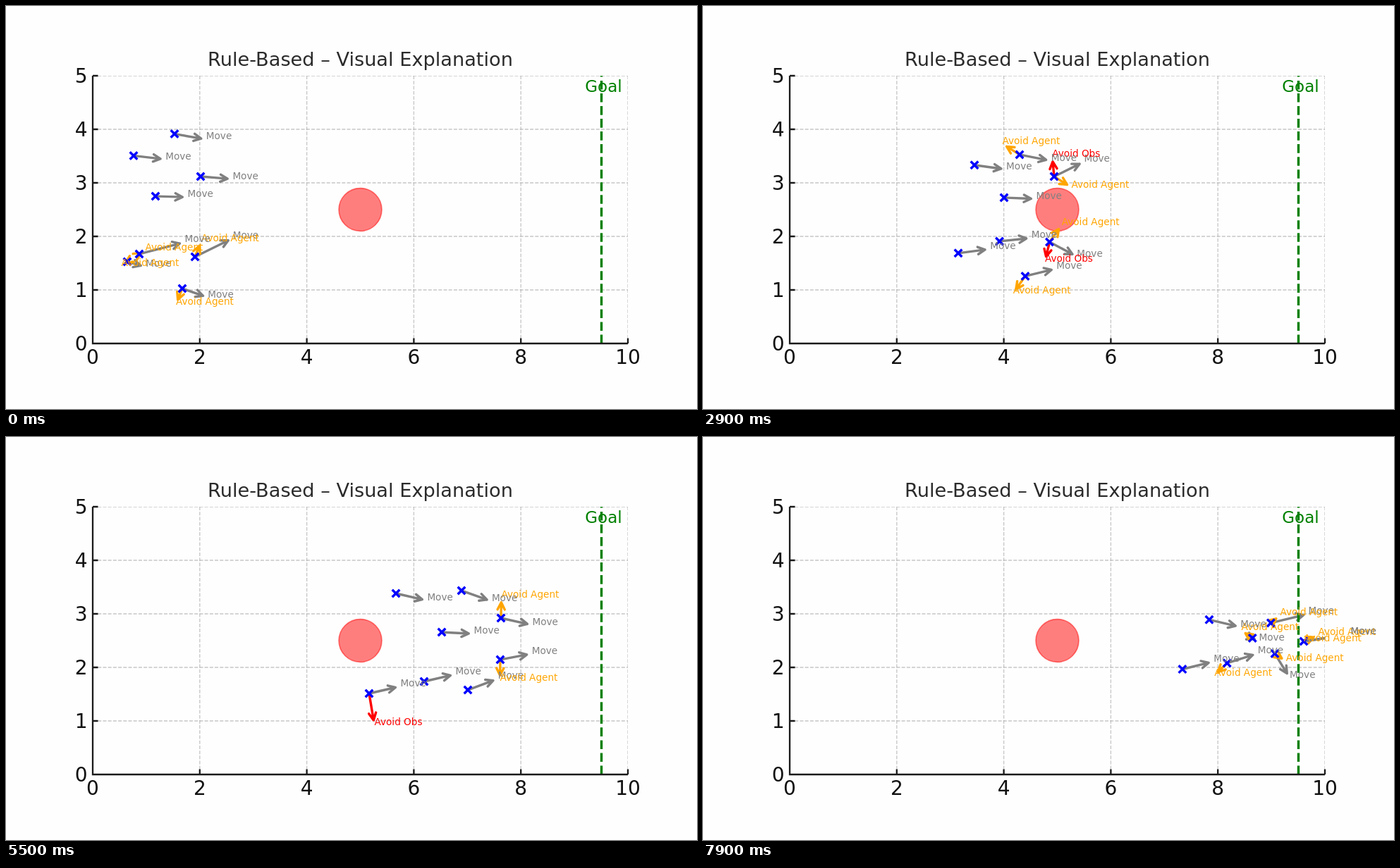
An HTML page for the animation above (8 s loop, 980x572 px).

```html
<!DOCTYPE html>
<html lang="en">
<head>
<meta charset="utf-8">
<title>Rule-Based – Visual Explanation</title>
<style>
  html, body { margin: 0; width: 100%; height: 100%; overflow: hidden; background: #fefefe; }
  svg { display: block; font-family: "DejaVu Sans", sans-serif; }
</style>
</head>
<body>
<svg width="980" height="572" viewBox="0 0 980 572">
  <defs><clipPath id="plot"><rect x="123" y="99" width="759" height="380"/></clipPath></defs>
  <g id="grid" clip-path="url(#plot)" stroke="#b0b0b0" stroke-opacity=".7" stroke-width="1.36" stroke-dasharray="5.03 2.18"></g>
  <circle cx="502.5" cy="289" r="30.4" fill="#f00" stroke="#f00" stroke-width="1.7" fill-opacity=".5" stroke-opacity=".5"/>
  <g id="arrows" clip-path="url(#plot)" fill="none" stroke-width="3.4" stroke-linecap="round" stroke-linejoin="round"></g>
  <path d="M844.5 479V99" stroke="#008000" stroke-width="3.4" stroke-dasharray="12.58 5.44"/>
  <path id="marks" fill="none" stroke="#00f" stroke-width="3.4"/>
  <path id="axes" fill="none" stroke="#1a1a1a" stroke-width="2.3"/>
  <g id="ticks" font-size="28" fill="#111"></g>
  <text x="502.5" y="85" font-size="27.2" fill="#2b2b2b" text-anchor="middle">Rule-Based – Visual Explanation</text>
  <text x="821.3" y="121.8" font-size="23" fill="#008000">Goal</text>
  <g id="labels" font-size="13.6"></g>
</svg>
<script>
const LOOP = 8000, STEP = 100;
const UNIT = 75.9;
const OBSTACLE = [502.5, 289], GOAL = [844.5, 289], FINISH = [852, 290];
const AGENT_RANGE = 60.6, CROWD_RANGE = 50, OBSTACLE_RANGE = 76.3, PUSH_RANGE = 74.2;
const FINAL_SPEED = .0615; // px per ms
const GRAY = '#808080', ORANGE = '#ffa500', RED = '#ff0000';

// Way points of each agent; after the last one it heads for the finish.
const times = [0, 2300, 3500, 5500, 7000];
const paths = [
  [[212, 270], [392, 274], [462, 270], [618, 277], [724, 282]],
  [[276, 242], [449, 254], [547, 230], [702, 257], [811, 261]],
  [[250, 401], [417, 383], [497, 384], [655, 359], [760, 329]],
  [[239, 181.5], [409, 210], [489, 212], [646, 218], [757, 237]],
  [[268, 356], [444, 328], [539, 342], [701, 316], [818, 313]],
  [[189, 352], [383, 332], [458, 336], [593, 347], [690, 336]],
  [[172, 363], [322, 355], [402, 346.5], [515, 364], [626, 342]],
  [[181, 212.5], [347, 224], [423, 227.5], [553, 222], [664, 247]]
];

const $ = id => document.getElementById(id);
const add = (a, b, k = 1) => [a[0] + b[0] * k, a[1] + b[1] * k];
const sub = (a, b) => add(a, b, -1);
const scale = (v, k) => [v[0] * k, v[1] * k];
const len = v => Math.hypot(v[0], v[1]);
const unit = v => scale(v, 1 / (len(v) || 1));
const fix = v => v.map(n => n.toFixed(2)).join(' ');

function position(path, t) {
  const next = times.findIndex(time => time > t);
  if (next < 0) {
    const last = path[path.length - 1], way = sub(FINISH, last);
    const run = (t - times[times.length - 1]) * FINAL_SPEED;
    return add(last, unit(way), Math.min(run, len(way)));
  }
  const k = (t - times[next - 1]) / (times[next] - times[next - 1]);
  return add(path[next - 1], sub(path[next], path[next - 1]), k);
}

// Head for the goal, pushed aside by the obstacle and by crowding agents.
function steering(p, others) {
  const way = sub(GOAL, p), away = sub(p, OBSTACLE);
  let v = scale(unit([Math.max(way[0], 40), way[1]]), .6 * UNIT);
  if (len(away) < PUSH_RANGE) v = add(v, unit(away), .36 * UNIT);
  for (const q of others) {
    const gap = sub(p, q);
    if (len(gap) < CROWD_RANGE) v = add(v, unit(gap), .3 * UNIT);
  }
  return v;
}

function arrow(from, vec, color) {
  const size = len(vec), u = unit(vec);
  if (!size) return '';
  const gap = size > 3.4 ? 3.4 : 0;
  const at = (along, side) => fix([
    from[0] + u[0] * along - u[1] * side,
    from[1] + u[1] * along + u[0] * side
  ]);
  const tip = size - gap - 3.8, back = tip - 10.2;
  return `<path stroke="${color}" d="M${at(gap, 0)}L${at(tip, 0)}M${at(back, 5.1)}L${at(tip, 0)}L${at(back, -5.1)}"/>`;
}

function drawStatic() {
  let grid = '', ticks = '', axes = 'M123 99V479H882';
  for (let v = 0; v <= 10; v += 2) {
    const x = 123 + v * UNIT;
    grid += `<path d="M${x} 479V99"/>`;
    axes += `M${x} 479v-7.5`;
    ticks += `<text x="${x}" y="508" text-anchor="middle">${v}</text>`;
  }
  for (let v = 0; v <= 5; v++) {
    const y = 479 - v * 76;
    grid += `<path d="M123 ${y}H882"/>`;
    axes += `M123 ${y}h7.5`;
    ticks += `<text x="115.5" y="${y + 10}" text-anchor="end">${v}</text>`;
  }
  $('grid').innerHTML = grid;
  $('ticks').innerHTML = ticks;
  $('axes').setAttribute('d', axes);
}

function draw(t) {
  const spots = paths.map(path => position(path, t));
  let arrows = '', labels = '', marks = '';
  const show = (from, vec, color, text) => {
    const [x, y] = add(from, vec);
    arrows += arrow(from, vec, color);
    labels += `<text x="${x.toFixed(2)}" y="${y.toFixed(2)}" fill="${color}">${text}</text>`;
  };
  for (const p of spots) {
    const others = spots.filter(q => q !== p);
    show(p, steering(p, others), GRAY, 'Move');

    const away = sub(p, OBSTACLE);
    if (len(away) < OBSTACLE_RANGE) show(p, scale(away, .6), RED, 'Avoid Obs');

    const near = others.find(q => len(sub(p, q)) < AGENT_RANGE);
    if (near) show(p, scale(sub(p, near), .5), ORANGE, 'Avoid Agent');

    marks += `M${fix(add(p, [-5.3, -5.3]))}l10.6 10.6m0 -10.6l-10.6 10.6`;
  }
  $('arrows').innerHTML = arrows;
  $('labels').innerHTML = labels;
  $('marks').setAttribute('d', marks);
}

let shown = -1;
function tick() {
  const t = Math.floor(performance.now() % LOOP / STEP) * STEP;
  if (t !== shown) draw(shown = t);
  requestAnimationFrame(tick);
}

drawStatic();
tick();
</script>
</body>
</html>
```
